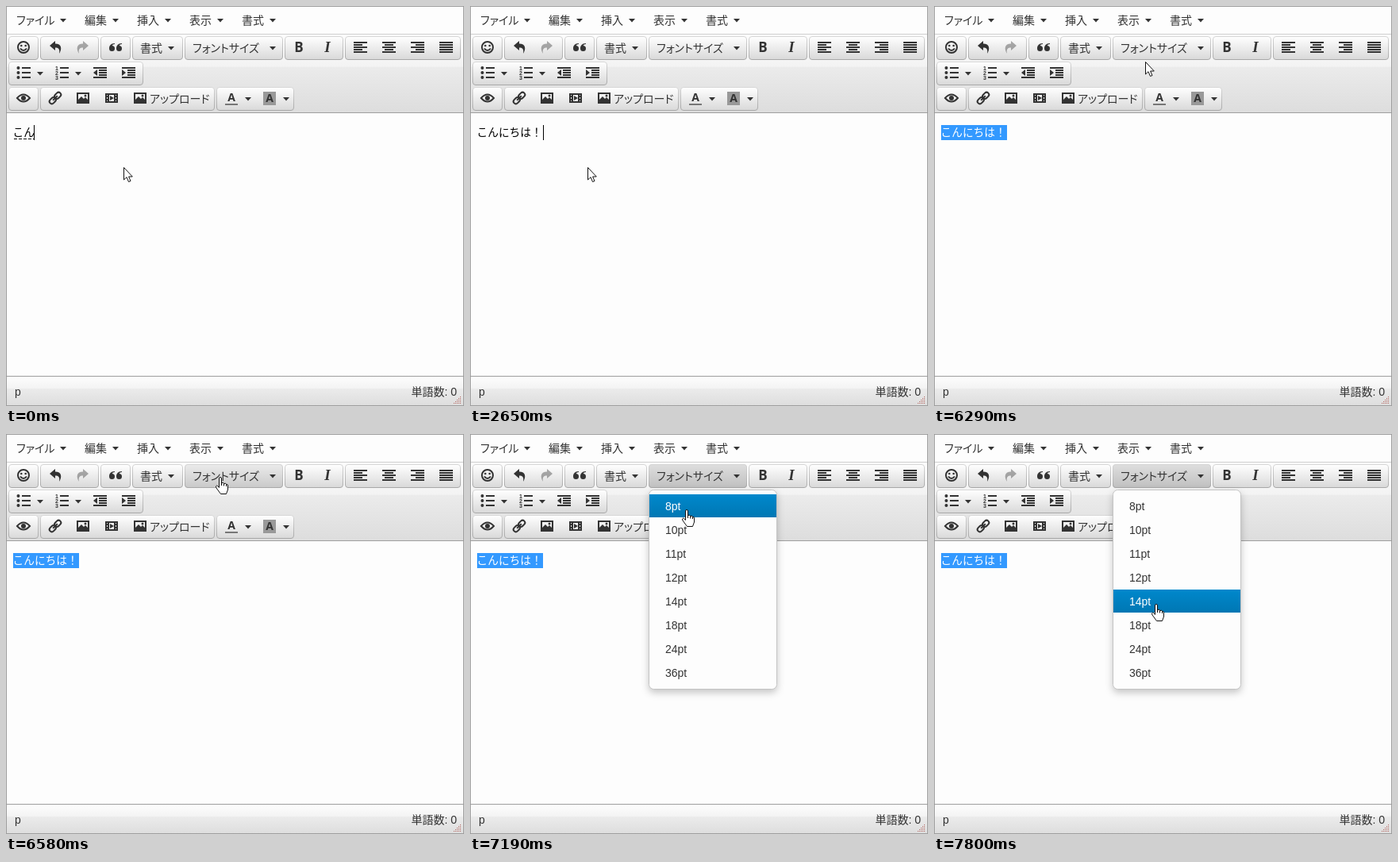
An HTML page that plays this animation: 577x504 px, repeating every 8000 ms.

```html
<!DOCTYPE html>
<html lang="ja">
<head>
<meta charset="utf-8">
<title>Editor</title>
<style>
html, body { margin: 0; width: 100%; height: 100%; overflow: hidden; background: #fdfdfd; }
svg { display: block; }
text { font: 14px "Liberation Sans", "Noto Sans CJK JP", "Noto Sans CJK", sans-serif; fill: #333; font-feature-settings: "palt"; }
.body text { font-size: 13.7px; font-feature-settings: normal; fill: #000; }
.body .picked text { fill: #fff; }
.line { fill: none; stroke: #333; stroke-width: 2; }
.head, .caret, .under, .picked, .hover, .menu, .window, .pointer, .arrow, .hand {
  animation: 8s step-end infinite;
}
.head { animation-name: type; }
.caret { animation-name: blink; }
.under { stroke: #000; }
.first { animation-name: first; }
.second { animation-name: second; }
.picked { animation-name: select; }
.hover { animation-name: hover; }
.menu { animation-name: open; filter: drop-shadow(0 4px 5px rgba(0,0,0,.22)); }
.window { animation-name: choose; transform: translateY(calc(var(--row) * 30px)); }
.window > g { transform: translateY(calc(var(--row) * -30px)); }
.pointer { animation-name: move; }
.arrow { animation-name: arrow; }
.hand { animation-name: hand; }

@keyframes type {
  0% { transform: translateX(35px); }
  1.5% { transform: translateX(49px); }
  3.5% { transform: translateX(62px); }
  7.375% { transform: translateX(77px); }
  14.125%, 100% { transform: translateX(92px); }
}
@keyframes blink {
  0%, 14.125%, 21.5%, 33.125%, 46.625%, 59.25% { opacity: 1; }
  11%, 17.625%, 27.375%, 40.875%, 54.375%, 67%, 100% { opacity: 0; }
}
@keyframes first {
  0% { stroke-dasharray: 4 2; stroke-width: 1px; opacity: 1; }
  11% { stroke-dasharray: none; stroke-width: 2px; opacity: 1; }
  14.125%, 100% { opacity: 0; }
}
@keyframes second {
  0% { stroke-dasharray: 4 2; stroke-width: 1px; opacity: 1; }
  17.625% { stroke-dasharray: none; stroke-width: 2px; opacity: 1; }
  21.5%, 100% { opacity: 0; }
}
@keyframes select { 0% { opacity: 0; } 68.875%, 100% { opacity: 1; } }
@keyframes hover { 0% { opacity: 0; } 80.375% { opacity: .6; } 84.25%, 100% { opacity: 1; } }
@keyframes open { 0% { opacity: 0; } 84.25%, 100% { opacity: 1; } }
@keyframes choose {
  0% { --row: -20; }
  88.125% { --row: 0; }
  91.75% { --row: 1; }
  93.625% { --row: 2; }
  95.5% { --row: 3; }
  97.5%, 100% { --row: 4; }
}
@keyframes move {
  0% { transform: translate(148px, 203px); }
  76.625% { transform: translate(220px, 122px); }
  78.625% { transform: translate(266px, 70px); }
  80.375% { transform: translate(264px, 58px); }
  82.25% { transform: translate(264px, 54px); }
  88.125% { transform: translate(266px, 77px); }
  89.875% { transform: translate(267px, 95px); }
  91.75% { transform: translate(269px, 124px); }
  93.625% { transform: translate(271px, 154px); }
  95.5% { transform: translate(273px, 185px); }
  97.5%, 100% { transform: translate(274px, 214px); }
}
@keyframes arrow { 0% { opacity: 1; } 80.375%, 100% { opacity: 0; } }
@keyframes hand { 0% { opacity: 0; } 80.375%, 100% { opacity: 1; } }
</style>
</head>
<body>
<svg width="577" height="504" viewBox="0 0 577 504">
  <defs>
    <linearGradient id="panel" x2="0" y2="1">
      <stop stop-color="#fdfdfd"/><stop offset=".41" stop-color="#f3f3f3"/>
      <stop offset=".42" stop-color="#ebebeb"/><stop offset="1" stop-color="#ddd"/>
    </linearGradient>
    <linearGradient id="button" x2="0" y2="1"><stop stop-color="#fff"/><stop offset="1" stop-color="#d9d9d9"/></linearGradient>
    <linearGradient id="pressed" x2="0" y2="1"><stop stop-color="#dedede"/><stop offset="1" stop-color="#c0c0c0"/></linearGradient>
    <linearGradient id="edge" x2="0" y2="1"><stop stop-color="#d6d6d6"/><stop offset="1" stop-color="#a8a8a8"/></linearGradient>
    <linearGradient id="blue" x2="0" y2="1"><stop stop-color="#08c"/><stop offset="1" stop-color="#0077b3"/></linearGradient>
    <clipPath id="row"><rect x="226" y="76" width="160" height="29"/></clipPath>
  </defs>

  <rect width="577" height="504" fill="#fdfdfd"/>
  <rect y="36" width="577" height="98" fill="url(#panel)"/>
  <rect y="467" width="577" height="37" fill="url(#panel)"/>
  <path d="M0 35.5H577" stroke="#cfcfcf"/>
  <path d="M0 134.5H577M0 466.5H577" stroke="#9e9e9e"/>
  <g id="bar" fill="#333"></g>

  <text x="11" y="491">p</text>
  <text x="568" y="491" text-anchor="end">単語数: 0</text>
  <path d="M564 500.5h10M566 498.5h8M568 496.5h6M570 494.5h4M572 492.5h2" stroke="#b5655f" stroke-dasharray="1 1"/>
  <rect x=".5" y=".5" width="576" height="503" fill="none" stroke="#9e9e9e"/>

  <g class="body">
    <text x="8.5" y="164">こんにちは！</text>
    <path class="under first" d="M10 167.5H76"/>
    <path class="under second" d="M78 167.5H91"/>
    <g class="head">
      <rect y="150" width="70" height="20" fill="#fdfdfd"/>
      <rect class="caret" y="150" width="1" height="19"/>
    </g>
    <g class="picked">
      <rect x="9" y="150" width="83" height="19" fill="#39f"/>
      <text x="8.5" y="164">こんにちは！</text>
    </g>
  </g>

  <g class="menu">
    <rect x="225.5" y="70.5" width="161" height="251" rx="6" fill="#fdfdfd" stroke="#c4c4c4"/>
    <g id="sizes"></g>
    <g class="window" clip-path="url(#row)">
      <rect x="226" y="76" width="160" height="29" fill="url(#blue)"/>
      <g id="chosen"></g>
    </g>
  </g>

  <g class="pointer" fill="#fff" stroke="#111">
    <path class="arrow" d="M.5 .5V16L4 12.7L6.5 18.5L9 17.5L6.6 12H11.3Z"/>
    <path class="hand" d="M4.5 13.5V2Q4.5 .5 6 .5T7.5 2V7.5Q10.5 6.5 10.5 8.5Q13.5 7.5 13.5 9.5Q15.5 9 15.5 11V16L13.5 21.5H6.5L1 14Q-.5 11.5 1.5 11Q2.5 10.8 4.5 13.5ZM7.5 7V11M10.5 8.5V11.5M13.5 9.5V12"/>
  </g>
</svg>
<script>
const bars = widths => widths.map(([x, w], i) => `<rect x="${x}" y="${3 * i - 7}" width="${w}" height="2"/>`).join('');
const full = [-8, 17];
const list = '<path class="line" d="M-2-6H9M-2 0H9M-2 6H9" stroke-width="3"/>';
const back = '<path d="M-7-2L0-8V-4.5C8-4.5 9 2 5 8C6 2 4 .5 0 .5V4Z"/>';
const picture = '<path class="line" d="M-7-6H7V6H-7Z"/><path d="M-6 5V2L-2-2L1 1L3-1L6 2V5Z"/><circle cx="3" cy="-3" r="1.5"/>';
const letter = (s, style) => `<text text-anchor="middle" style="${style}">${s}</text>`;
const shift = arrow => bars([full, [-1, 10], [-1, 10], [-1, 10], full]) + `<path d="${arrow}"/>`;

const icons = {
  smile: '<circle class="line" r="7"/><circle cx="-2.7" cy="-2" r="1.3"/><circle cx="2.7" cy="-2" r="1.3"/><path class="line" d="M-4 1.5Q0 6.5 4 1.5"/>',
  undo: back,
  redo: `<g transform="scale(-1 1)" opacity=".4">${back}</g>`,
  quote: '<path id="q" d="M-1-5C-6-5-8-2-8 1.5A3.5 3.5 0 1 0-4.5-2Q-3.5-4-1-4Z"/><use href="#q" x="9"/>',
  bold: `<g transform="translate(0 6)">${letter('B', 'font:bold 17px Open Sans,sans-serif')}</g>`,
  italic: `<g transform="translate(0 6)">${letter('I', 'font:italic bold 19px Liberation Serif,serif')}</g>`,
  left: bars([full, [-8, 11], full, [-8, 11], full]),
  center: bars([full, [-5, 11], full, [-5, 11], full]),
  right: bars([full, [-2, 11], full, [-2, 11], full]),
  justify: bars([full, full, full, full, full]),
  bullets: list + '<circle cx="-6.5" cy="-6" r="2"/><circle cx="-6.5" r="2"/><circle cx="-6.5" cy="6" r="2"/>',
  numbers: list + [1, 2, 3].map((n, i) => `<text x="-8" y="${6 * i - 3.5}" style="font:bold 7px Liberation Sans,sans-serif">${n}</text>`).join(''),
  outdent: shift('M-8 0L-3-4V4Z'),
  indent: shift('M-3 0L-8-4V4Z'),
  eye: '<path class="line" d="M-8 0Q0-9 8 0Q0 9-8 0Z" stroke-width="1.5"/><circle r="3"/>',
  link: '<g class="line" transform="rotate(-45)"><rect x="-9" y="-3" width="9" height="6" rx="3"/><rect x="0" y="-3" width="9" height="6" rx="3"/><path d="M-4 0H4"/></g>',
  picture,
  film: '<path class="line" d="M-7-5H7V5H-7ZM-4-5V5M4-5V5"/><path class="line" d="M-8-2H-4M-8 2H-4M4-2H8M4 2H8" stroke-width="1"/><path d="M-2-3L3 0L-2 3Z"/>',
  ink: `<g transform="translate(0 4)">${letter('A', 'font:bold 14px Open Sans,sans-serif')}</g><rect x="-8" y="7" width="16" height="2" fill="#777"/>`,
  mark: `<rect x="-8" y="-8" width="16" height="17" fill="#999"/><g transform="translate(0 5)">${letter('A', 'font:bold 14px Open Sans,sans-serif')}</g>`
};

const icon = (name, x, y) => `<g transform="translate(${x} ${y})">${icons[name]}</g>`;
const label = (s, x, y) => `<text x="${x}" y="${y}">${s}</text>`;
const arrow = (x, y) => `<path d="M${x - 4} ${y - 2}h8l-4 4.5z"/>`;
const box = (l, r, y, fill = 'button') =>
  `<rect x="${l + .5}" y="${y + .5}" width="${r - l - 1}" height="29" rx="3.5" fill="url(#${fill})" stroke="url(#edge)"/>`;

const rows = [
  { y: 38, boxes: [[3, 41], [43, 117], [119, 157], [159, 223], [225, 349], [351, 425], [427, 573]],
    icons: { smile: 22, undo: 62, redo: 97, quote: 138, bold: 369, italic: 405, left: 446, center: 482, right: 518, justify: 554 },
    arrows: [208, 336], labels: [['書式', 169], ['フォントサイズ', 235]] },
  { y: 70, boxes: [[3, 173]],
    icons: { bullets: 22, numbers: 70, outdent: 118, indent: 154 }, arrows: [43, 91], labels: [] },
  { y: 102, boxes: [[3, 41], [43, 263], [265, 363]],
    icons: { eye: 22, link: 62, picture: 97, film: 133, ink: 284, mark: 332 }, arrows: [305, 353], labels: [['アップロード', 181]] }
];

const menus = [['ファイル', 13, 72], ['編集', 99, 138], ['挿入', 165, 204], ['表示', 231, 270], ['書式', 297, 336]];
let html = menus.map(([s, x, a]) => label(s, x, 22.5) + arrow(a, 18)).join('');
for (const { y, boxes, icons: names, arrows, labels } of rows) {
  html += boxes.map(([l, r]) => box(l, r, y)).join('');
  if (y === 38) html += `<g class="hover">${box(225, 349, y, 'pressed')}</g>`;
  html += Object.entries(names).map(([name, x]) => icon(name, x, y + 14)).join('');
  html += arrows.map(x => arrow(x, y + 15)).join('');
  html += labels.map(([s, x]) => label(s, x, y + 19.5)).join('');
}
document.getElementById('bar').innerHTML = html + icon('picture', 169, 116);

const sizes = [8, 10, 11, 12, 14, 18, 24, 36];
const items = fill => sizes.map((n, i) => `<text x="246" y="${96 + 30 * i}" style="fill:${fill}">${n}pt</text>`).join('');
document.getElementById('sizes').innerHTML = items('#333');
document.getElementById('chosen').innerHTML = items('#fff');
</script>
</body>
</html>
```
